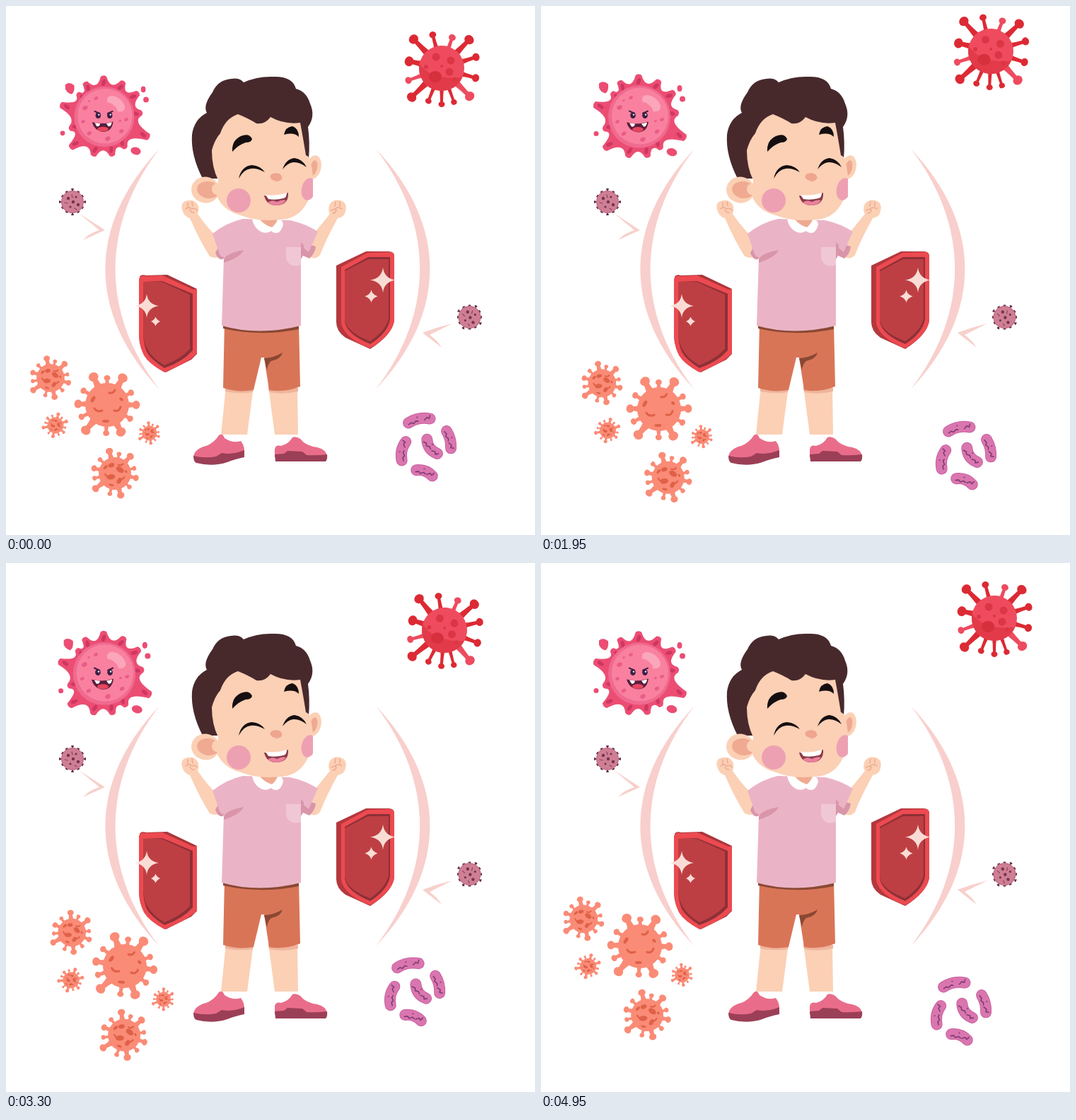
An HTML page with a canvas for the animation above (5 s loop, 748 px wide and 748 px high).

```html
<!DOCTYPE html>
<html lang="en">
<head>
<meta charset="utf-8">
<style>
html, body { margin: 0; width: 100%; height: 100%; overflow: hidden; background: #fff; }
canvas { display: block; width: 748px; height: 748px; }
</style>
</head>
<body>
<canvas id="stage" width="748" height="748"></canvas>
<script>
const ctx = document.getElementById('stage').getContext('2d');
const LOOP = 5000, STEP = 50, RAD = Math.PI / 180;
const SKIN = '#fbd0b5', SKIN_DARK = '#efaa91', HAIR = '#47292c', INK = '#150e10';

// Tracks: [time, x, y, degrees]
const redTrack = [
  [0, 0, 0, 0], [550, -3, 1, 5], [850, -6, 8, 8], [1120, -2, 2, 4], [1550, 18, -9, 0],
  [1750, 26, -25, 0], [1950, 20, -24, 2], [2200, -6, -1, 5], [2750, -5, 2, 8],
  [3050, 6, 4, 6], [3300, 4, 7, 5], [3850, 4, 15, 4], [4400, 12, 17, 3],
  [4800, 28, -2, 1], [4950, 25, -10, 0]
];
const clusterTrack = [
  [0, 0, 0, 0], [300, -16, -5, 3], [550, -25, -3, 6], [850, -18, 5, 6.4], [1120, -10, 27, 2],
  [1550, 13, 10, -3], [1950, 24, 6, -1], [2260, 5, 17, 3], [2750, 17, 24, 7],
  [3300, 25, 6, 7], [3850, 11, -5, 5.4], [4130, -4, 3, 4], [4400, -3, -3, 2], [4950, -3, -22, .5]
];
const bacteriaTrack = [
  [0, 0, 0, 0], [850, -11, 4, 0], [1550, 5, 13, -2], [1950, 7, 12, 0],
  [2750, -7, -25, 1.5], [3850, -20, -3, -1.5], [4950, 0, 10, 0]
];
const pulseTrack = [
  [-250, .815], [0, .967], [60, .99], [200, 1], [450, 1], [850, .862],
  [1130, .803], [1250, .815], [1500, .967], [1560, .99]
];

// Smooth interpolation through the keys of a track.
function sample(keys, t) {
  let i = 0;
  while (i < keys.length - 2 && t >= keys[i + 1][0]) i++;
  const a = keys[i], b = keys[i + 1], p = keys[i - 1] || a, n = keys[i + 2] || b;
  const span = b[0] - a[0], u = (t - a[0]) / span;
  return a.slice(1).map((v, k) => {
    const c = k + 1;
    const m0 = (b[c] - p[c]) / (b[0] - p[0]) * span;
    const m1 = (n[c] - v) / (n[0] - a[0]) * span;
    return v + m0 * u + (3 * (b[c] - v) - 2 * m0 - m1) * u * u + (m0 + m1 - 2 * (b[c] - v)) * u ** 3;
  });
}

function fill(color, d) {
  ctx.fillStyle = color;
  ctx.fill(new Path2D(d));
}
function line(color, width, d) {
  ctx.strokeStyle = color;
  ctx.lineWidth = width;
  ctx.lineCap = ctx.lineJoin = 'round';
  ctx.stroke(new Path2D(d));
}
function oval(color, x, y, rx, ry = rx, deg = 0) {
  ctx.fillStyle = color;
  ctx.beginPath();
  ctx.ellipse(x, y, rx, ry, deg * RAD, 0, Math.PI * 2);
  ctx.fill();
}
function at(x, y, deg, scale, draw) {
  ctx.save();
  ctx.translate(x, y);
  ctx.rotate(deg * RAD);
  ctx.scale(scale, scale);
  draw();
  ctx.restore();
}
function mirrored(axis, draw) {
  ctx.save();
  ctx.translate(axis * 2, 0);
  ctx.scale(-1, 1);
  draw();
  ctx.restore();
}
function spike(color, deg, length, knob, base, neck) {
  at(0, 0, deg, 1, () => {
    fill(color, `M22 ${-base} Q${length * .72} ${-neck} ${length} ${-neck} V${neck} Q${length * .72} ${neck} 22 ${base}Z`);
    oval(color, length, 0, knob * .9, knob);
  });
}

const redSpikes = [
  [-105, 49, 5], [-71, 46, 5, 1], [-46, 56, 7], [-18, 51, 5.6], [16, 50, 5.6], [45, 56, 7, 1],
  [70, 51, 4.2], [90, 51, 4.5], [112, 50, 4.5], [136, 59, 7], [160, 50, 5, 1], [192, 47, 7], [226, 57, 7]
];
function redVirus() {
  for (const [deg, length, knob, light] of redSpikes)
    spike(light ? '#ee4b5f' : '#dc2a34', deg, length, knob, knob * .8, knob * .42);
  oval('#ee4c5e', 0, 0, 32);
  ctx.save();
  ctx.beginPath();
  ctx.arc(0, 0, 32, 0, 7);
  ctx.clip();
  fill('#e23a48', 'M-36 -14 Q-20 20 34 12 V40 H-36Z');
  ctx.restore();
  oval('#d6303d', -9, 12, 9, 8);
  oval('#dc3545', -8, -16, 5.5);
  oval('#dc3545', 13, -11, 5.5);
  oval('#dc3545', 11, 5, 5.5);
  oval('#dc3545', 18, 16, 3);
  oval('#dc3545', -22, -2, 3);
  oval('#dc3545', 0, -3, 2);
}

const orangeSpikes = [
  [-116, 44, 7], [-90, 38, 4.5], [-60, 44, 7], [-27, 38, 4.5], [0, 41, 6], [31, 38, 4.5],
  [63, 43, 7], [92, 40, 4.5], [130, 47, 7], [155, 40, 4.5], [182, 41, 6], [211, 39, 4.5]
];
function orangeVirus() {
  for (const [deg, length, knob] of orangeSpikes) spike('#fa8b76', deg, length, knob, knob + 1, knob * .5);
  oval('#fa8b76', 0, 0, 31);
  const spot = '#df6148';
  line(spot, 3, 'M-18 5 Q-14 11 -7 8 M10 8 Q17 10 19 3 M3 -17 Q9 -16 11 -21');
  oval(spot, -20, -8, 5, 2.5, -60);
  oval(spot, 20, -8, 3, 2, 40);
  oval(spot, -2, 23, 5, 2);
}
function smallOrange(x, y, scale, deg) {
  at(x, y, deg, scale, () => {
    orangeVirus();
    const spot = '#df6148';
    oval(spot, -6, 8, 8, 5, -20);
    oval(spot, 8, -9, 8, 5, 20);
    oval(spot, 11, 12, 6, 4, 110);
    oval(spot, -10, -14, 6, 4, -30);
  });
}
function cluster() {
  orangeVirus();
  smallOrange(-80, -38, .64, 15);
  smallOrange(-73, 29, .37, 40);
  smallOrange(60, 40, .335, 20);
  smallOrange(11, 97, .74, 12);
}

function bacterium(x, y, length, deg, bend) {
  at(x, y, deg, 1, () => {
    const h = length / 2 - 7.5;
    const curve = `M${-h} ${bend / 2} Q0 ${-bend * 1.5} ${h} ${bend / 2}`;
    line('#c960a0', 16, curve);
    line('#da76af', 14, curve);
    line('#7d3c70', 1.6, `M${-h} 4 l4 -2 3 2 4 -3 3 1 M${h - 8} 2 l4 -3 3 2 2 -4`);
    oval('#9c4a86', h, -1, 1.3);
    oval('#9c4a86', -2, -4, 1.2);
  });
}
function bacteria() {
  bacterium(-17, -39, 46, -11, 3);
  bacterium(-40, 5, 42, -78, 3);
  bacterium(26, -11, 40, 76, 2);
  bacterium(0, 0, 40, 54, -4);
  bacterium(-9, 35, 39, 20, 3);
}

// Spike tips of the angry blob: [degrees, radius]
const blobTips = [
  [-91, 60], [-62, 59], [-36, 61], [-7, 55], [24, 71], [55, 54], [78, 57],
  [106, 58], [138, 66], [162, 53], [196, 66], [222, 52], [241, 58]
];
function angryBlob() {
  const polar = (deg, r) => [Math.cos(deg * RAD) * r, Math.sin(deg * RAD) * r];
  ctx.fillStyle = '#ec4d73';
  ctx.beginPath();
  blobTips.forEach(([deg, r], i) => {
    const next = i + 1 < blobTips.length ? blobTips[i + 1][0] : blobTips[0][0] + 360;
    if (!i) ctx.moveTo(...polar(deg - 4, r));
    else ctx.lineTo(...polar(deg - 4, r));
    ctx.quadraticCurveTo(...polar(deg, r + 3), ...polar(deg + 4, r));
    ctx.quadraticCurveTo(...polar((deg + next) / 2, 40), ...polar(next - 4, blobTips[(i + 1) % blobTips.length][1]));
  });
  ctx.fill();
  oval('#ec4d73', 0, 0, 48);
  for (const [deg, r] of blobTips) {
    const [x, y] = polar(deg, r - 9);
    oval('#cf3762', x, y, 5, 2.7, deg + 20);
  }
  oval('#f06a8f', 0, -1, 44);
  oval('#f9819f', 1, -2, 40);
  oval('#fba6ba', 17, -20, 15, 9, 38);
  oval('#f9819f', 11, -15, 10, 4, 38);
  [[-28, -14, 4], [-31, 6, 3], [-22, 23, 3.5], [5, 31, 4], [25, 20, 3.5], [32, 3, 3], [-12, -28, 3], [23, 5, 2], [-22, -24, 1.8]]
    .forEach(([x, y, r]) => oval('#e95d87', x, y, r, r * .75, -30));
  fill('#ec4d73', 'M-57 -48 Q-51 -53 -44 -47 Q-43 -37 -48 -34 Q-55 -36 -57 -42Z');
  oval('#ec4d73', 57, -41, 3.5, 4.5);
  oval('#ec4d73', 61, -26, 4);
  oval('#ec4d73', -61, 23, 3.5);
  oval('#ec4d73', 46, 49, 7.5, 5.5, 15);
  oval('#3b2047', -9, -3, 3.8, 4.5);
  oval('#3b2047', 8, -3, 3.8, 4.5);
  oval('#fff', -8, -4, 1.2);
  oval('#fff', 9, -4, 1.2);
  line('#3b2047', 2, 'M-14 -9 L-7 -6 M5 -6 L12 -9');
  fill('#5a1e3d', 'M-18 7 Q-2 11 13 6 Q11 21 -2 21 Q-14 20 -18 7Z');
  oval('#e8455f', -2, 17, 8, 3.5);
  fill('#fff', 'M-14 8 L-6 9 Q-7 14 -11 13Z M3 9 L11 7 Q10 14 6 13Z');
}

function tinyVirus(x, y, turn) {
  at(x, y, turn, 1, () => {
    for (let i = 0; i < 12; i++) {
      const r = i % 3 ? 16.5 : 18;
      at(0, 0, i * 30, 1, () => line('#632d4c', 2, `M14 0 H${r} M${r} -1 V1`));
    }
    oval('#bd6b83', 0, 0, 16);
    oval('#cf7f94', 0, 0, 14.8);
    [[-6, -5], [5, -7], [8, 4], [-3, 7], [1, 0]].forEach(([a, b], i) => oval('#743450', a, b, i % 2 ? 1.6 : 2.2));
    line('#8b4561', 1.2, 'M-11 1 l4 1 M3 9 l3 2 M-1 -10 l1 4');
  });
}

function star(x, y, rx, ry = rx) {
  fill('#fadcd5', `M${x} ${y - ry} Q${x + 1.5} ${y - 2.5} ${x + rx} ${y} Q${x + 1.5} ${y + 2.5} ${x} ${y + ry}
    Q${x - 1.5} ${y + 2.5} ${x - rx} ${y} Q${x - 1.5} ${y - 2.5} ${x} ${y - ry}Z`);
}
function leftShield() {
  fill('#a9363c', 'M189 383 Q191 379 198 381 L228 380 L270 400 V492 L262 500 L226 518 L200 500 Q188 485 188 465Z');
  fill('#ec4a50', 'M188 386 Q190 380 197 382 L221 381 L265 401 L270 400 V491 Q260 503 224 518 Q202 506 195 494 Q188 480 188 462Z');
  fill('#8d3037', 'M194 390 L221 389 L264 407 V487 Q250 503 224 512 Q205 500 199 489 Q194 477 194 462Z');
  fill('#bd3f43', 'M194 390 L220 390 L260 408 V485 Q247 499 224 508 Q207 498 201 487 Q194 476 194 461Z');
  star(199, 424, 17);
  star(211.5, 446, 6.5);
}
function rightShield() {
  fill('#b4383e', 'M467 367 L509 347 L541 347 Q549 347 549 354 V445 Q546 465 515 485 L480 469 Q467 460 467 447Z');
  fill('#ec4a50', 'M474 369 L511 349 L541 348 Q549 347 549 354 V445 Q546 465 515 484 Q479 470 474 449Z');
  fill('#8d3037', 'M479 373 L512 355 H543 V443 Q540 462 515 478 Q483 465 479 447Z');
  fill('#bd3f43', 'M479 375 L512 358 H541 V442 Q537 459 515 474 Q483 462 479 445Z');
  star(533, 387.5, 18);
  star(516.5, 410.5, 9);
}

function barrier() {
  fill('#f8cfcc', 'M217 202 C115 310 115 434 217 542 C134 434 134 310 217 202Z');
}
function arrows() {
  fill('#f8d0ca', 'M103 293 L140 317 Q124 324 109 331 Q118 321 132 317Z');
  fill('#f8d0ca', 'M631 449 Q610 454 589 462 L616 483 Q610 473 599 465Z');
}

function legs() {
  fill(SKIN, 'M311 538 H350 L341 606 H304Z M371 538 H412 L413 606 H380Z');
  fill('#efb49c', 'M310 540 H350 L349 546 Q330 549 310 545Z M371 540 H413 V545 Q392 550 372 546Z');
  fill('#d97557', 'M309 448 H414 L416 538 Q393 547 372 543 L365 497 H361 L350 543 Q328 547 307 540Z');
  fill('#8a4833', 'M307 449 H414 V457 Q360 468 307 456Z');
  fill('#8a4833', 'M365 498 Q380 497 391 490 Q389 499 375 502 Q370 506 369 515Z');
  fill('#e96d8a', 'M265 637 Q267 626 283 622 Q294 618 301 607 Q306 603 309 611 Q321 619 332 615 Q339 624 336 635 Q318 645 298 646 Q274 648 265 637Z');
  fill('#9b3f57', 'M265 636 Q281 640 297 637 L305 632 Q320 635 337 628 V638 Q323 641 313 645 Q292 652 269 646 Q265 644 265 636Z');
  fill('#e96d8a', 'M380 638 V627 Q381 620 389 622 Q400 619 405 610 Q410 608 416 612 Q424 622 440 624 Q453 627 454 637Z');
  fill('#9b3f57', 'M380 634 L393 633 L398 629 L419 630 L425 635 Q440 636 454 634 Q455 641 452 644 H381Z');
}

function arms() {
  fill(SKIN, 'M249 288 Q246 277 257 275 Q268 273 272 283 Q273 289 271 294 Q286 316 305 333 L304 352 Q298 359 288 354 Q274 332 260 300 Q252 298 249 288Z');
  fill(SKIN, 'M480 290 Q483 278 473 275 Q462 272 457 282 Q455 289 458 294 L432 326 L426 352 Q436 361 444 352 Q452 331 469 300 Q479 298 480 290Z');
  line(SKIN_DARK, 1.5, 'M254 287 Q258 283 263 287 M257 278 V284 M263 277 L264 283 M263 287 Q268 285 270 289 M260 288 Q262 293 266 292');
  line(SKIN_DARK, 1.5, 'M475 287 Q470 283 465 287 M472 277 V283 M466 277 L465 283 M460 289 Q465 286 467 289 Q466 293 462 293');
}

function shirt() {
  fill('#d995a9', 'M296 349 L303 336 L318 336 L307 358 Q300 360 296 349Z M420 335 L438 340 Q437 350 429 357 L420 353Z');
  fill('#ebb4c6', 'M335 301 Q312 306 292 322 L302 351 Q304 355 308 355 L305 452 Q357 467 417 452 V339 L428 348 L441 319 Q424 308 402 303Z');
  fill('#d995a9', 'M308 359 Q310 350 336 345 Q332 355 308 363Z M417 334 L421 338 L420 353 L417 358Z');
  fill('#f0c7d5', 'M396 341 H417 V366 Q407 370 400 364 Q396 360 396 354Z');
  fill(SKIN_DARK, 'M357 297 H386 L384 309 Q374 318 361 307Z');
  fill('#fff', 'M348 301 Q352 299 359 302 Q366 310 376 313 Q383 307 384 301 Q391 301 392 309 Q389 320 383 321 Q377 321 375 318 Q368 323 360 319 Q350 313 348 301Z');
}

function head() {
  fill(HAIR, `M278 244 Q261 211 263 182 Q266 160 284 151 Q278 141 292 122 Q299 105 318 103 Q330 101 336 108
    Q356 99 378 100 Q405 99 410 117 Q425 121 430 138 Q438 156 427 171 Q430 193 428 216 H330 L302 244Z`);
  oval(SKIN, 282, 260, 20, 18.5, 8);
  oval(SKIN_DARK, 286, 260, 16, 12, 8);
  oval(SKIN, 298, 259, 7, 8);
  oval(SKIN, 435, 228, 10.5, 17, 12);
  oval(SKIN_DARK, 435, 229, 5, 11, 12);
  fill(SKIN, `M300 246 Q291 228 291 204 Q295 189 303 180 Q310 159 328 153 Q343 159 354 166 Q366 168 374 157
    Q394 168 416 165 Q420 186 424 211 Q430 213 431 222 Q438 252 429 271 Q419 296 397 301 Q360 307 332 296 Q306 289 298 268Z`);
  oval('#eea0b3', 329, 275, 17);
  ctx.save();
  ctx.beginPath();
  ctx.rect(410, 240, 24, 40);
  ctx.clip();
  oval('#eea0b3', 428, 259, 10, 16, 12);
  ctx.restore();
  fill(INK, 'M320 206 Q319 190 332 184 Q344 179 348 188 Q347 193 339 193 Q329 196 320 206Z');
  fill(INK, 'M393 182 Q395 171 405 170 Q414 173 414 185 Q407 178 393 182Z');
  fill(INK, 'M329 244 Q333 226 348 225 Q360 226 366 235 Q355 229 346 230 Q336 231 329 244Z');
  fill(INK, 'M391 231 Q396 216 408 215 Q420 217 425 228 Q415 220 406 221 Q398 222 391 231Z');
  oval('#efa58e', 382, 242, 8.5, 5.5, 8);
  fill('#efa58e', 'M376 240 Q382 233 389 239 L383 249Z');
  fill('#8c3a48', 'M365 268 Q383 270 399 264 Q400 281 383 282 Q368 282 365 268Z');
  fill('#e9819c', 'M370 278 Q376 273 383 277 Q391 273 396 275 Q391 282 383 282 Q375 282 370 278Z');
  fill('#fff', 'M367 267 Q383 269 397 264 Q397 271 392 272 Q381 275 371 273Z');
}

function scene(t) {
  ctx.fillStyle = '#fff';
  ctx.fillRect(0, 0, 748, 748);
  barrier();
  mirrored(370, barrier);
  arrows();
  tinyVirus(94, 277, 0);
  tinyVirus(655.5, 440, 30);
  leftShield();
  rightShield();
  legs();
  arms();
  shirt();
  head();

  const place = (x, y, track, draw) => {
    const [dx, dy, deg] = sample(track, t);
    at(x + dx, y + dy, deg, 1, draw);
  };
  at(139, 157.6, 0, sample(pulseTrack, t % 1500)[0], angryBlob);
  place(616, 88, redTrack, redVirus);
  place(143, 564, clusterTrack, cluster);
  place(601, 624, bacteriaTrack, bacteria);
}

const start = performance.now();
function tick() {
  const elapsed = (performance.now() - start) % LOOP;
  scene(Math.floor(elapsed / STEP) * STEP);
  requestAnimationFrame(tick);
}
tick();
</script>
</body>
</html>
```
